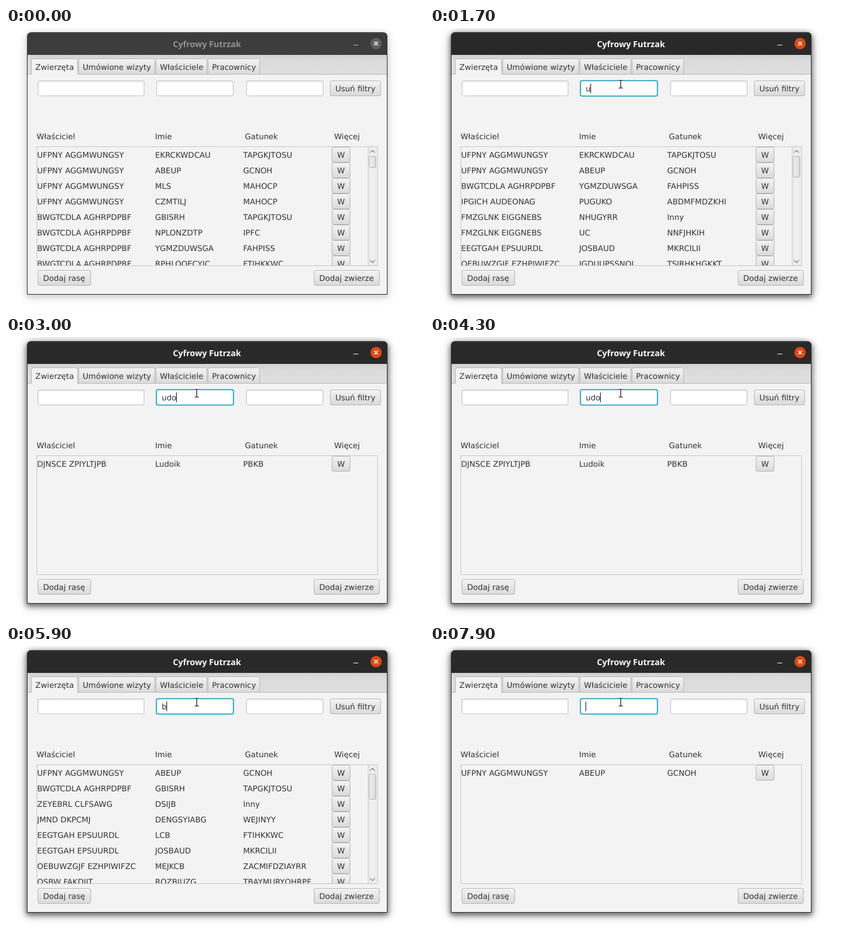
Recreate the animation shown at these times as an HTML page. Size 698 px wide and 470 px high, loop 8 s.

```html
<!DOCTYPE html>
<html lang="pl">
<head>
<meta charset="utf-8">
<title>Cyfrowy Futrzak</title>
<style>
html, body { margin: 0; width: 100%; height: 100%; overflow: hidden; background: #fff; }
#stage { position: relative; width: 698px; height: 470px; overflow: hidden; }
.shadow { position: absolute; left: 35px; top: 7px; width: 602px; height: 439px; border-radius: 8px 8px 0 0; }
#dim { box-shadow: 0 3px 9px 1px rgba(0,0,0,.13), 0 3px 18px 2px rgba(0,0,0,.10); }
#lit { box-shadow: 0 3px 9px 1px rgba(0,0,0,.46), 0 3px 18px 2px rgba(0,0,0,.12); }
svg { position: absolute; left: 0; top: 0; }
text { font: 13px "DejaVu Sans", sans-serif; fill: #323232; text-rendering: geometricPrecision; white-space: pre; }
.title { font: bold 14px "Noto Sans", "Open Sans", sans-serif; text-anchor: middle; }
</style>
</head>
<body>
<div id="stage">
  <div class="shadow" id="dim"></div>
  <div class="shadow" id="lit"></div>
  <svg id="view" width="698" height="470" viewBox="0 0 698 470">
    <defs>
      <linearGradient id="face" x2="0" y2="1"><stop stop-color="#f3f3f3"/><stop offset="1" stop-color="#dadada"/></linearGradient>
      <linearGradient id="strip" x2="0" y2="1"><stop stop-color="#d2d2d2"/><stop offset=".35" stop-color="#dcdcdc"/><stop offset="1" stop-color="#dedede"/></linearGradient>
      <linearGradient id="well" x2="0" y2="1"><stop stop-color="#ebebeb"/><stop offset=".18" stop-color="#fff"/></linearGradient>
      <linearGradient id="thumb"><stop stop-color="#f0f0f0"/><stop offset="1" stop-color="#dadada"/></linearGradient>
      <linearGradient id="track"><stop stop-color="#e2e2e2"/><stop offset=".4" stop-color="#f0f0f0"/><stop offset="1" stop-color="#ececec"/></linearGradient>
      <clipPath id="pane"><rect x="52" y="199" width="568" height="198"/></clipPath>
    </defs>
  </svg>
</div>
<script>
const LOOP = 8000;
const view = document.getElementById('view');
const lit = document.getElementById('lit');

// Rows as owner, name, species
const parse = s => s.trim().split('\n').map(line => line.trim().split('|'));
const LISTS = {
  all: parse(`UFPNY AGGMWUNGSY|EKRCKWDCAU|TAPGKJTOSU
    UFPNY AGGMWUNGSY|ABEUP|GCNOH
    UFPNY AGGMWUNGSY|MLS|MAHOCP
    UFPNY AGGMWUNGSY|CZMTILJ|MAHOCP
    BWGTCDLA AGHRPDPBF|GBISRH|TAPGKJTOSU
    BWGTCDLA AGHRPDPBF|NPLONZDTP|IPFC
    BWGTCDLA AGHRPDPBF|YGMZDUWSGA|FAHPISS
    BWGTCDLA AGHRPDPBF|RPHLOOECYJC|FTIHKKWC`),
  u: parse(`UFPNY AGGMWUNGSY|EKRCKWDCAU|TAPGKJTOSU
    UFPNY AGGMWUNGSY|ABEUP|GCNOH
    BWGTCDLA AGHRPDPBF|YGMZDUWSGA|FAHPISS
    IPGICH AUDEONAG|PUGUKO|ABDMFMDZKHI
    FMZGLNK EIGGNEBS|NHUGYRR|Inny
    FMZGLNK EIGGNEBS|UC|NNFJHKIH
    EEGTGAH EPSUURDL|JOSBAUD|MKRCILII
    OEBUWZGJF EZHPIWIFZC|IGDUUPSSNOL|TSIRHKHGKKT`),
  ud: parse(`EEGTGAH EPSUURDL|JOSBAUD|MKRCILII
    OSBW FAKDIIT|HUDRWEK|FAHPISS
    DJNSCE ZPIYLTJPB|Ludoik|PBKB`),
  udo: parse('DJNSCE ZPIYLTJPB|Ludoik|PBKB'),
  b: parse(`UFPNY AGGMWUNGSY|ABEUP|GCNOH
    BWGTCDLA AGHRPDPBF|GBISRH|TAPGKJTOSU
    ZEYEBRL CLFSAWG|DSIJB|Inny
    JMND DKPCMJ|DENGSYIABG|WEJINYY
    EEGTGAH EPSUURDL|LCB|FTIHKKWC
    EEGTGAH EPSUURDL|JOSBAUD|MKRCILII
    OEBUWZGJF EZHPIWIFZC|MEJKCB|ZACMIFDZIAYRR
    OSBW FAKDIIT|ROZBJUZG|TBAYMURYQHRPF`),
  be: parse('UFPNY AGGMWUNGSY|ABEUP|GCNOH')
};
const THUMB = { all: 20, u: 36, b: 43 };

// Each step changes only the listed properties
const STEPS = [
  [0, { lit: 0, field: 0, caret: 0, text: '', list: 'all', pointer: null }],
  [500, { lit: .35, pointer: [294, 96] }],
  [600, { lit: .75, field: 1, caret: 1, pointer: [296, 94] }],
  [700, { lit: 1 }],
  [900, { pointer: [297, 95] }],
  [1100, { pointer: [303, 101] }],
  [1200, { pointer: [313, 100] }],
  [1300, { pointer: [318, 94], caret: 0 }],
  [1600, { text: 'u', caret: 1 }],
  [1700, { list: 'u' }],
  [2200, { text: 'ud', list: 'ud' }],
  [2800, { text: 'udo' }],
  [3000, { list: 'udo' }],
  [3300, { caret: 0 }],
  [3700, { text: 'udoi', caret: 1 }],
  [4100, { caret: 0 }],
  [4300, { text: 'udo', caret: 1 }],
  [4700, { text: 'ud', list: 'ud' }],
  [4900, { text: '', list: 'all' }],
  [5700, { caret: 0 }],
  [5900, { text: 'b', list: 'b', caret: 1 }],
  [6300, { caret: 0 }],
  [6800, { caret: 1 }],
  [7300, { text: 'be', list: 'be' }],
  [7800, { caret: 0 }],
  [7900, { text: '', caret: 1 }]
];

function add(tag, attrs, parent = view) {
  const el = document.createElementNS('http://www.w3.org/2000/svg', tag);
  for (const k in attrs) el.setAttribute(k, attrs[k]);
  return parent.appendChild(el);
}
const group = (attrs = {}) => add('g', attrs);
const path = (d, attrs, parent) => add('path', { d, fill: 'none', ...attrs }, parent);
const fill = (x, y, width, height, color, parent) => add('rect', { x, y, width, height, fill: color }, parent);

function label(x, y, s, parent, attrs) {
  const el = add('text', { x, y, ...attrs }, parent);
  el.textContent = s;
  return el;
}
function box(x, y, w, h, paint, line, parent) {
  return add('rect', { x: x + .5, y: y + .5, width: w - 1, height: h - 1, rx: 2.5, fill: paint, stroke: line }, parent);
}
function button(x, y, w, s, pad, parent) {
  box(x, y, w, 26, 'url(#face)', '#b4b4b4', parent);
  path(`M${x + 2} ${y + 1.5}h${w - 4}`, { stroke: '#fafafa' }, parent);
  label(x + pad, y + 18, s, parent);
}

// Window frame and title bar, dim and lit versions stacked
function titleBar(parent, bar, ink, knob, glyph) {
  path('M35 45V15q0-8 8-8H629q8 0 8 8V45z', { fill: bar }, parent);
  path('M42 8.5H630', { stroke: '#fff', 'stroke-opacity': .08 }, parent);
  label(335.5, 32, 'Cyfrowy Futrzak', parent, { class: 'title', style: `fill:${ink}` });
  path('M580 28.5h8', { stroke: glyph }, parent);
  add('circle', { cx: 618, cy: 26, r: 9.5, fill: knob }, parent);
  path('M614.7 22.7l6.6 6.6m0-6.6l-6.6 6.6', { stroke: '#fff', 'stroke-width': 1.5 }, parent);
}
fill(35, 44, 602, 402, '#2e2e2e');
fill(36, 45, 600, 400, '#f3f3f3');
titleBar(group(), '#3c3c3c', '#949494', '#5e5e5e', '#b4b4b4');
const litBar = group();
titleBar(litBar, '#292929', '#fff', '#dd4814', '#f0f0f0');

// Tabs
fill(36, 45, 600, 33, 'url(#strip)');
path('M36 77.5H636', { stroke: '#b8b8b8' });
function tab(x, w, s, selected) {
  path(`M${x + .5} 78V54.5q0-3 3-3h${w - 7}q3 0 3 3V78`,
    { fill: selected ? '#f3f3f3' : 'url(#face)', stroke: '#b8b8b8' });
  if (!selected) path(`M${x} 77.5h${w}`, { stroke: '#b8b8b8' });
  label(x + 7, 70, s);
}
tab(42, 78, 'Zwierzęta', true);
tab(121, 128, 'Umówione wizyty');
tab(250, 86, 'Właściciele');
tab(337, 87, 'Pracownicy');

// Filters, headings and fixed buttons
[[53, 178], [251, 129], [401, 129]].forEach(([x, w]) => box(x, 88, w, 26, 'url(#well)', '#bfbfbf'));
const ring = group();
add('rect', { x: 249.6, y: 86.6, width: 131.8, height: 28.8, rx: 4, fill: '#039ed3', 'fill-opacity': .13 }, ring);
add('rect', { x: 251.3, y: 88.3, width: 128.4, height: 25.4, rx: 2.5, fill: '#fff', stroke: '#1a9cc2', 'stroke-width': 1.6 }, ring);
const query = label(260, 106, '');
const caret = fill(0, 93, 1, 16, '#000');
button(541, 88, 85, 'Usuń filtry', 9);
button(53, 405, 89, 'Dodaj rasę', 9);
button(514, 405, 110, 'Dodaj zwierze', 9);
[[51, 'Właściciel'], [249, 'Imie'], [399, 'Gatunek'], [548, 'Więcej']].forEach(([x, s]) => label(x, 186, s));

// Scroll pane
add('rect', { x: 51.5, y: 198.5, width: 569, height: 199, fill: '#f3f3f3', stroke: '#c6c6c6' });
const panes = {};
for (const [key, rows] of Object.entries(LISTS)) {
  const g = panes[key] = group({ 'clip-path': 'url(#pane)' });
  rows.forEach((row, i) => {
    const y = 199 + 26 * i;
    row.forEach((s, col) => label([52, 249, 396][col], y + 18, s, g));
    button(544, y, 31, 'W', 9.1, g);
  });
  if (THUMB[key]) {
    fill(604, 199, 16, 198, 'url(#track)', g);
    path('M604.5 199v198', { stroke: '#d4d4d4' }, g);
    path('M608 208.5l4-4 4 4M608 388.5l4 4 4-4', { stroke: '#7a7a7a', 'stroke-width': 1.2 }, g);
    box(606, 214, 12, THUMB[key], 'url(#thumb)', '#b0b0b0', g);
  }
}

// Text pointer, drawn around its hot spot
const pointer = group();
const beam = 'M-3.5-6.5h2.5l1 1 1-1h2.5M0-5.5v11M-3.5 6.5h2.5l1-1 1 1h2.5';
path(beam, { stroke: '#fff', 'stroke-width': 3 }, pointer);
path(beam, { stroke: '#111', 'stroke-width': 1.2 }, pointer);

function stateAt(t) {
  return Object.assign({}, ...STEPS.filter(s => s[0] <= t).map(s => s[1]));
}
const show = (el, on) => el.setAttribute('visibility', on ? 'visible' : 'hidden');

function draw(t) {
  const s = stateAt(t);
  lit.style.opacity = s.lit;
  litBar.setAttribute('opacity', s.lit);
  show(ring, s.field);
  query.textContent = s.text;
  const width = s.text ? query.getComputedTextLength() : 0;
  caret.setAttribute('x', 259.6 + width);
  show(caret, s.caret);
  for (const key in panes) show(panes[key], key === s.list);
  show(pointer, s.pointer);
  if (s.pointer) pointer.setAttribute('transform', `translate(${s.pointer[0] + .5} ${s.pointer[1]})`);
}

const start = performance.now();
function tick() {
  draw((performance.now() - start) % LOOP);
  requestAnimationFrame(tick);
}
tick();
</script>
</body>
</html>
```
